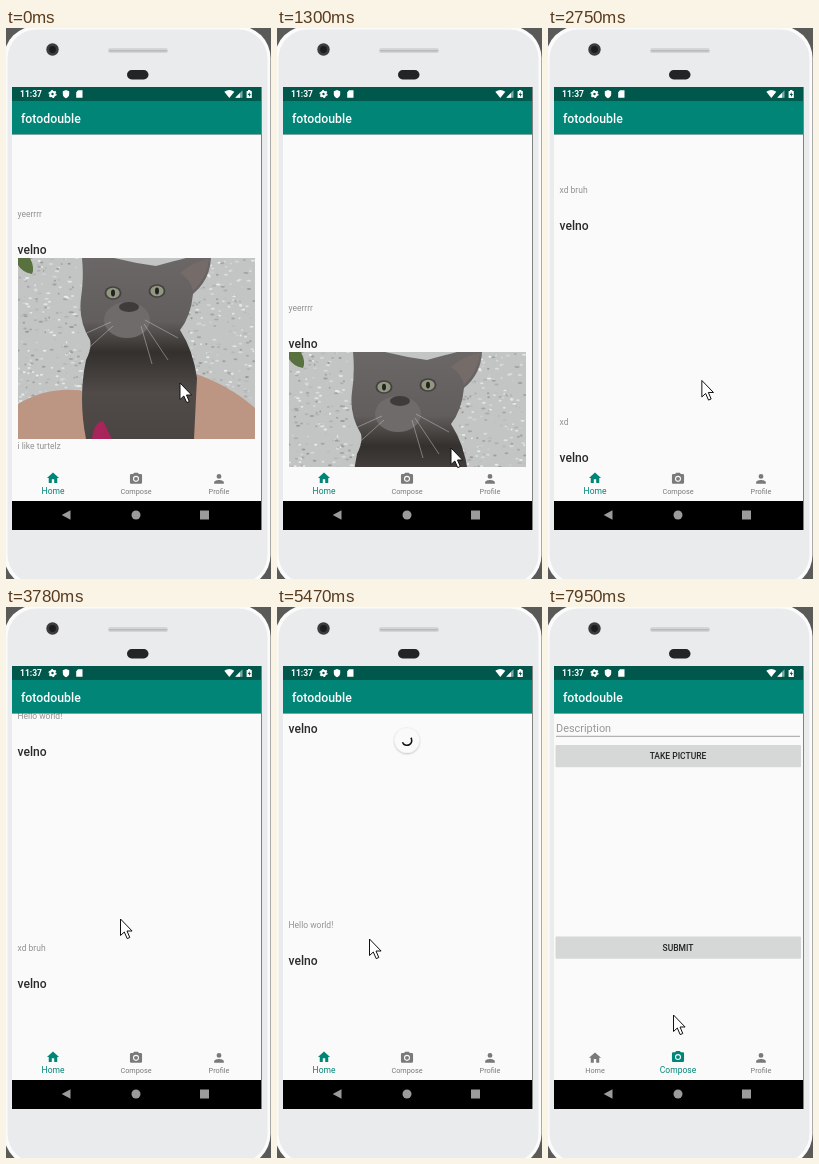
These frames come from a looping animation (265 px wide and 551 px high, 8000 ms). An HTML page:

```html
<!DOCTYPE html>
<html lang="en">
<head>
<meta charset="utf-8">
<style>
html, body { margin: 0; width: 100%; height: 100%; overflow: hidden; background: #5a5a58; }
svg { display: block; width: 265px; height: 551px; font-family: Roboto, sans-serif; }
.mid { text-anchor: middle; }
.name { font-size: 12.1px; font-weight: 500; fill: #2a2a2a; }
.caption { font-size: 8.5px; fill: #939393; }
.button { font-size: 8.5px; font-weight: 500; fill: #222; text-anchor: middle; }
</style>
</head>
<body>
<svg viewBox="0 0 265 551">
  <defs>
    <clipPath id="page"><rect x="6" y="106" width="249" height="367"/></clipPath>
    <clipPath id="photoBox"><rect x="12" width="237" height="181"/></clipPath>
    <filter id="shadow" x="-30%" y="-30%" width="160%" height="160%">
      <feDropShadow dx="0" dy="0.7" stdDeviation="1" flood-opacity=".3"/>
    </filter>
    <linearGradient id="fur" x2="0" y2="1">
      <stop stop-color="#6b6766"/>
      <stop offset=".35" stop-color="#625e5d"/>
      <stop offset=".52" stop-color="#34302e"/>
      <stop offset=".75" stop-color="#504b49"/>
      <stop offset="1" stop-color="#4a4543"/>
    </linearGradient>
  </defs>

  <!-- phone body -->
  <rect x="-2" y="-2" width="266.5" height="561" rx="32" fill="#fbfbfb"/>
  <rect x="1.5" y="1.5" width="260" height="554" rx="29" fill="#e9ebec"/>
  <circle cx="46.5" cy="21.5" r="6.2" fill="#3c3c3e"/>
  <circle cx="46.5" cy="21.5" r="3.4" fill="#1b1c20"/>
  <rect x="102" y="20" width="60" height="5" rx="2.5" fill="#d4d5d6"/>
  <rect x="103" y="22" width="58" height="1.5" rx=".7" fill="#b8b9ba"/>
  <rect x="121" y="42" width="21.5" height="9.5" rx="4.7" fill="#232425"/>

  <!-- status bar and toolbar -->
  <rect x="6" y="59" width="250" height="443" fill="#808282"/>
  <rect x="6" y="59" width="249" height="443" fill="#fafafa"/>
  <rect x="6" y="59" width="249" height="14" fill="#00574b"/>
  <rect x="6" y="73" width="249" height="33" fill="#008577"/>
  <g fill="#fff">
    <text x="14" y="69.2" font-size="8.5" font-weight="700">11:37</text>
    <circle cx="46.5" cy="66" r="2.2" fill="none" stroke="#fff" stroke-width="2"/>
    <circle cx="46.5" cy="66" r="3.5" fill="none" stroke="#fff" stroke-width="1.2" stroke-dasharray="1.8 1.87"/>
    <path d="M60 62l3.2 1.3v2.7q0 3-3.2 4.3-3.2-1.3-3.2-4.3v-2.7z"/>
    <path d="M72 62.3h4.5v7.4h-6.3v-5.5z"/>
    <path d="M218.3 63.7q5-3.2 10 0l-5 6.2z"/>
    <path d="M236.5 62.3v7.4h-7.4z" opacity=".5"/>
    <path d="M234 65v4.7h-4.7z"/>
    <path d="M242 62h2.4v.9h1.4v7h-5.2v-7h1.4z"/>
    <path d="M243.7 64l-2 2.9h1.3v2l2-2.9h-1.3z" fill="#00574b"/>
    <text x="15" y="95" font-size="12.3" font-weight="500">fotodouble</text>
  </g>

  <g clip-path="url(#page)">
    <g id="feed"></g>
    <g id="spinner">
      <circle r="12.3" fill="#fafafa" filter="url(#shadow)"/>
      <path id="arc" fill="none" stroke="#111" stroke-width="1.6"/>
    </g>
    <g id="compose">
      <text x="8" y="124.6" font-size="10.9" fill="#989898">Description</text>
      <path d="M8 129.3H252" stroke="#8c8c8c" stroke-width=".8"/>
      <g fill="#d6d7d7">
        <rect x="7.5" y="138" width="245.5" height="22.3" rx="1"/>
        <rect x="7.5" y="329.5" width="245.5" height="22.3" rx="1"/>
      </g>
      <text class="button" x="130" y="152">TAKE PICTURE</text>
      <text class="button" x="130" y="343.5">SUBMIT</text>
    </g>
    <rect x="6" y="439" width="249" height="34" fill="#fafafa"/>
    <circle id="ripple" fill="#dadada"/>
    <rect x="6" y="106" width="249" height="1" fill="#00574b" opacity=".5"/>
  </g>
  <g id="tabs"></g>

  <!-- system navigation -->
  <rect x="6" y="473" width="249" height="29" fill="#000"/>
  <g fill="#9b9b9b">
    <path d="M64.5 482.3v9.4l-8.8-4.7z"/>
    <circle cx="130" cy="487" r="4.5"/>
    <rect x="194" y="482.5" width="9" height="9"/>
  </g>
  <path id="cursor" d="M0 0V16.5L3.8 13 6.7 19.6 9.3 18.5 6.5 12H11.6z" fill="#fff" stroke="#111"/>
</svg>

<script>
const $ = id => document.getElementById(id);
const LOOP = 8000, HOLD = 124, PITCH = 232, TEAL = '#008577', GREY = '#7a7a7a';

const progress = (t, start, length) => Math.min(1, Math.max(0, (t - start) / length));
const easeOut = p => 1 - (1 - p) ** 2;
const smooth = p => p * p * (3 - 2 * p);

// Each fling: start, duration, distance.
const flings = [[950, 978, 160], [2170, 820, 333], [3432, 818, 188], [4550, 380, 147]];
const scrollAt = t => flings.reduce(
  (y, [start, length, distance]) => y - distance * easeOut(progress(t, start, length)), 828);

// Each pointer move: start, duration, end point.
const moves = [
  [950, 350, 174, 420], [1420, 400, 164.5, 253], [2170, 340, 158, 415], [2520, 470, 139.5, 136],
  [3430, 350, 114.5, 312], [4150, 200, 114, 235], [4550, 400, 112, 375], [5180, 200, 92.5, 332],
  [5500, 700, 115.5, 450], [7680, 190, 125.5, 408]
];
const cursorAt = t => moves.reduce(([x, y], [start, length, toX, toY]) => {
  const p = smooth(progress(t, start, length));
  return [x + (toX - x) * p, y + (toY - y) * p];
}, [174, 355]);

function gravel() {
  let seed = 7, out = '';
  const rnd = () => (seed = seed * 16807 % 2147483647) / 2147483647;
  for (let i = 0; i < 900; i++) {
    const light = 150 + rnd() * 85 | 0;
    out += `<ellipse cx="${12 + rnd() * 237}" cy="${rnd() * 150}" rx="${0.8 + rnd() * 1.6}" ry="1"
      fill="rgb(${light},${light + 3},${light + 2})"/>`;
  }
  return out;
}

const eye = (x, y) => `<ellipse cx="${x}" cy="${y}" rx="8.5" ry="6.8" fill="#454142"/>
  <ellipse cx="${x}" cy="${y}" rx="6.6" ry="5.2" fill="#92977f"/>
  <ellipse cx="${x}" cy="${y}" rx="2" ry="3.4" fill="#222"/>`;

const photo = y => `<g transform="translate(0 ${y})" clip-path="url(#photoBox)">
  <rect x="12" width="237" height="181" fill="#c2c5c4"/>${gravel()}
  <path d="M12 146Q45 126 84 134V181H12zM184 114Q222 126 249 150V181H184z" fill="#bd9583"/>
  <path d="M12 0H24Q29 10 26 16Q16 14 12 7z" fill="#59703f"/>
  <path d="M76 0H205Q204 22 187 36Q185 58 174 72Q187 92 191 120L188 181H80Q72 140 80 102Q86 90 84 82Q72 62 75 40Q78 20 76 0z" fill="url(#fur)"/>
  <path d="M108 0Q128 5 150 8Q168 3 180 0z" fill="#c2c5c4"/>
  <path d="M174 15Q188 3 203 1Q201 20 187 33Q185 22 174 15z" fill="#756b69"/>
  <ellipse cx="121" cy="62" rx="23" ry="18" fill="#6f6b6a"/>
  ${eye(107, 35)}${eye(151, 33)}
  <ellipse cx="123" cy="49" rx="10" ry="5" fill="#3f3b3b"/>
  <path d="M105 64L74 78M107 68L78 94M139 62L172 80M138 66L162 102M135 68L146 106" stroke="#c4c4c4" stroke-width=".5"/>
  <path d="M86 181Q88 164 97 163L106 181z" fill="#a8245a"/>
</g>`;

const captions = ['Hello world!', 'xd bruh', 'xd', 'yeerrrr', 'i like turtelz'];
$('feed').innerHTML = captions.map((caption, i) => {
  const y = 121 + i * PITCH;
  return `<text class="name" x="11.5" y="${y + 4.7}">velno</text>
    <text class="caption" x="11.5" y="${y + 199.7}">${caption}</text>`;
}).join('') + photo(130 + 4 * PITCH);

const tabs = [
  ['Home', 47, 'M10 20v-6h4v6h5v-8h3L12 3 2 12h3v8z'],
  ['Compose', 130, 'M9 2L7.2 4H4a2 2 0 0 0-2 2v12a2 2 0 0 0 2 2h16a2 2 0 0 0 2-2V6a2 2 0 0 0-2-2h-3.2L15 2zM12 7a5 5 0 0 1 0 10a5 5 0 0 1 0-10zM12 8.8a3.2 3.2 0 0 0 0 6.4a3.2 3.2 0 0 0 0-6.4z'],
  ['Profile', 213, 'M12 12a4 4 0 0 0 0-8a4 4 0 0 0 0 8zM12 14c-2.7 0-8 1.3-8 4v2h16v-2c0-2.7-5.3-4-8-4z']
];
$('tabs').innerHTML = tabs.map(([label, x, d]) => `<g>
  <path d="${d}" fill-rule="evenodd"/><text class="mid" x="${x}" y="466.3">${label}</text></g>`).join('');

function drawTabs(colored, enlarged) {
  tabs.forEach(([, x], i) => {
    const tab = $('tabs').children[i], [icon, label] = tab.children;
    const big = i === enlarged;
    tab.setAttribute('fill', i === colored ? TEAL : GREY);
    icon.setAttribute('transform', `translate(${x - 7.27} ${big ? 442.8 : 443.6}) scale(.606)`);
    label.setAttribute('font-size', big ? 8.5 : 7.3);
  });
}

// Spinner arc: the head runs ahead for half a cycle, then the tail catches up.
function arcPath(t) {
  const turns = (t - 4545) / 1332, cycle = Math.floor(turns), p = turns - cycle;
  const ease = q => smooth(q ** 0.75);
  const base = 0.138 + 0.81 * turns + 0.79 * cycle;
  const from = base + 0.78 * ease(Math.max(0, 2 * p - 1));
  const to = base + 0.01 + 0.78 * ease(Math.min(1, 2 * p));
  const point = a => `${4.8 * Math.cos(a * 2 * Math.PI)} ${4.8 * Math.sin(a * 2 * Math.PI)}`;
  return `M${point(from)}A4.8 4.8 0 ${to - from > 0.5 ? 1 : 0} 1 ${point(to)}`;
}

const show = (id, on) => $(id).style.display = on ? '' : 'none';
const move = (id, x, y, extra = '') => $(id).setAttribute('transform', `translate(${x} ${y}) ${extra}`);

function draw(now) {
  const time = now % LOOP;
  // The screen refreshes in steps and holds in between.
  const t = 60 + Math.floor((time - 60) / HOLD) * HOLD;
  const composing = time >= 7090, pressed = time >= 6790;

  show('feed', !composing);
  show('compose', composing);
  move('feed', 0, -scrollAt(t));
  move('cursor', ...cursorAt(t));

  show('spinner', t > 4980 && !composing);
  move('spinner', 130, 133.5, `scale(${0.6 + 0.4 * progress(t, 5000, 150)})`);
  $('arc').setAttribute('d', arcPath(t));

  const spread = progress(t, 6756, HOLD);
  show('ripple', pressed && !composing);
  move('ripple', 120.5 + 9.5 * spread, 453.5 + 2 * spread);
  $('ripple').setAttribute('r', 33 + 12 * spread);

  drawTabs(time >= 6940 ? 1 : 0, composing ? 1 : 0);
  requestAnimationFrame(() => draw(performance.now() - start));
}
const start = performance.now();
draw(0);
</script>
</body>
</html>
```
